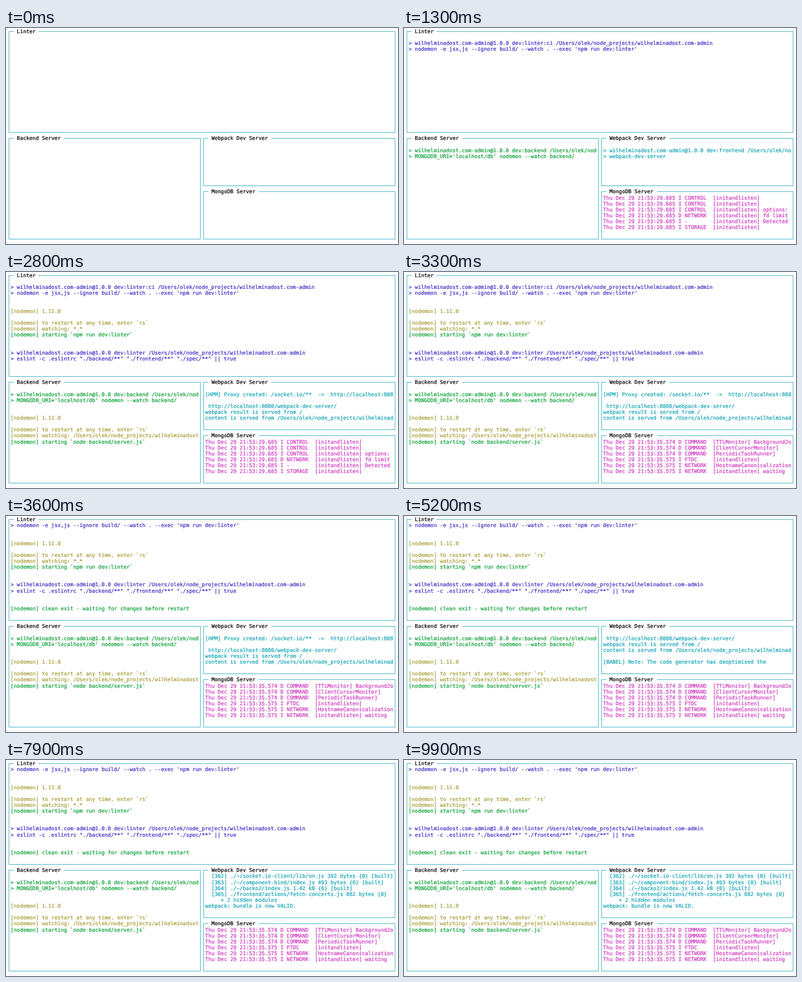
An HTML page for the animation above (10000 ms loop, 600x332 px).

```html
<!DOCTYPE html>
<html>
<head>
<meta charset="utf-8">
<title>Dev dashboard</title>
<style>
  html, body { margin: 0; width: 100%; height: 100%; overflow: hidden; background: #fff; }
  svg { display: block; }
  text {
    font: 7.98px "DejaVu Sans Mono", monospace; white-space: pre;
    text-rendering: geometricPrecision; stroke-width: 0.2;
  }
  path { fill: none; stroke: #5fbfcb; stroke-width: 1; shape-rendering: crispEdges; }
</style>
</head>
<body>
<svg id="screen" width="600" height="332" viewBox="0 0 600 332"></svg>
<script>
const LOOP = 10000, CELL = 4.804, ROW = 9.125;
const GREEN = '#08a035', YELLOW = '#a59d35', CYAN = '#10a3b5';
const colX = col => 2.2 + col * CELL;
const rowY = row => 5.1 + row * ROW;

// Terminal grid positions: left, right, top and bottom border cells.
const panes = {
  linter:  { title: 'Linter', left: 0, right: 123, top: 0, bottom: 17, color: '#3d2cc6' },
  backend: { title: 'Backend Server', left: 0, right: 61, top: 18, bottom: 35, color: GREEN },
  webpack: { title: 'Webpack Dev Server', left: 62, right: 123, top: 18, bottom: 26, color: CYAN },
  mongo:   { title: 'MongoDB Server', left: 62, right: 123, top: 27, bottom: 35, color: '#cf38c0' }
};

const app = 'wilhelminadost.com-admin';
const home = '/Users/olek/node_projects/' + app;
const npm = (script, command) => `\n> ${app}@1.0.0 ${script} ${home}\n> ${command}\n\n`;
const nodemon = (watched, command) => `[nodemon] 1.11.0

[nodemon] to restart at any time, enter \`rs\`
[nodemon] watching: ${watched}
[nodemon] starting \`${command}\`
`;
const mongo = (second, entries) =>
  entries.map(entry => `Thu Dec 29 21:53:${second} ${entry}\n`).join('');

// Output chunks: time in ms, pane, text.
const output = [
  [1100, 'linter', npm('dev:linter:ci', "nodemon -e jsx,js --ignore build/ --watch . --exec 'npm run dev:linter'")],
  [1100, 'backend', npm('dev:backend', "MONGODB_URI='localhost/db' nodemon --watch backend/")],
  [1100, 'webpack', npm('dev:frontend', 'webpack-dev-server')],
  [1100, 'mongo', mongo('29.685', [
    'I CONTROL  [initandlisten]',
    'I CONTROL  [initandlisten]',
    'I CONTROL  [initandlisten] options:',
    'D NETWORK  [initandlisten] fd limit',
    'I -        [initandlisten] Detected',
    'I STORAGE  [initandlisten]'])],
  [1700, 'linter', '\n' + nodemon('*.*', 'npm run dev:linter')],
  [1700, 'backend', '\n' + nodemon(home, 'node backend/server.js')],
  [2100, 'linter', '\n' + npm('dev:linter', 'eslint -c .eslintrc "./backend/**" "./frontend/**" "./spec/**" || true')],
  [2400, 'webpack', `
[HPM] Proxy created: /socket.io/**  ->  http://localhost:8080

 http://localhost:8080/webpack-dev-server/
webpack result is served from /
content is served from ${home}
`],
  [3200, 'mongo', mongo('35.574', [
    'D COMMAND  [TTLMonitor] BackgroundJob',
    'D COMMAND  [ClientCursorMonitor]',
    'D COMMAND  [PeriodicTaskRunner]']) + mongo('35.575', [
    'I FTDC     [initandlisten]',
    'I NETWORK  [HostnameCanonicalization',
    'I NETWORK  [initandlisten] waiting'])],
  [3500, 'linter', '\n[nodemon] clean exit - waiting for changes before restart\n'],
  [4100, 'webpack', '\n[BABEL] Note: The code generator has deoptimised the\n'],
  [6100, 'webpack', `  [242] ./~/react-router/lib/IndexRedirect.js 1.92 kB {0}
  [243] ./~/react-router/lib/Redirect.js 3 kB {0} [built]
  [244] ./~/react-router/lib/IndexRoute.js 1.83 kB {0}
  [245] ./~/react-router/lib/Route.js 1.75 kB {0} [built]
  [246] ./~/react-router/lib/match.js 2.85 kB {0} [built]
  [247] ./~/history/lib/Actions.js 628 bytes {0} [built]
  [248] ./~/react-rou`],
  [6500, 'webpack', `
  [362] ./~/socket.io-client/lib/on.js 392 bytes {0} [built]
  [363] ./~/component-bind/index.js 493 bytes {0} [built]
  [364] ./~/backo2/index.js 1.42 kB {0} [built]
  [365] ./frontend/actions/fetch-concerts.js 882 bytes {0}
     + 2 hidden modules
webpack: bundle is now VALID.
`]
];

const textAt = (col, row, color, text) =>
  `<text x="${colX(col)}" y="${rowY(row) + 2.9}" fill="${color}" stroke="${color}">${text}</text>`;

function lineColor(line, pane) {
  if (!line.startsWith('[nodemon]')) return pane.color;
  return /starting|clean exit/.test(line) ? GREEN : YELLOW;
}

function drawPane(name, pane, time) {
  const { title, left, right, top, bottom } = pane;
  const pixel = v => Math.floor(v) + 0.5;
  const x1 = pixel(colX(left + 0.5)), x2 = pixel(colX(right + 0.5));
  const y1 = pixel(rowY(top)), y2 = pixel(rowY(bottom));
  const frame = `<path d="M${colX(left + 2)} ${y1}H${x1}V${y2}H${x2}V${y1}H${colX(left + title.length + 4)}"/>`;

  const log = output.filter(([at, target]) => target === name && at <= time)
    .map(chunk => chunk[2]).join('');
  const lines = log.split('\n').slice(top + 1 - bottom).map((line, i) =>
    line && textAt(left + 1, top + 1 + i, lineColor(line, pane), line.slice(0, right - left - 1)));
  return frame + textAt(left + 3, top, '#000', title) + lines.join('');
}

const screen = document.getElementById('screen');
let shown = '';
function render(now) {
  const time = now % LOOP;
  const markup = Object.entries(panes).map(([name, pane]) => drawPane(name, pane, time)).join('');
  if (markup !== shown) screen.innerHTML = shown = markup;
  requestAnimationFrame(render);
}
render(0);
</script>
</body>
</html>
```
